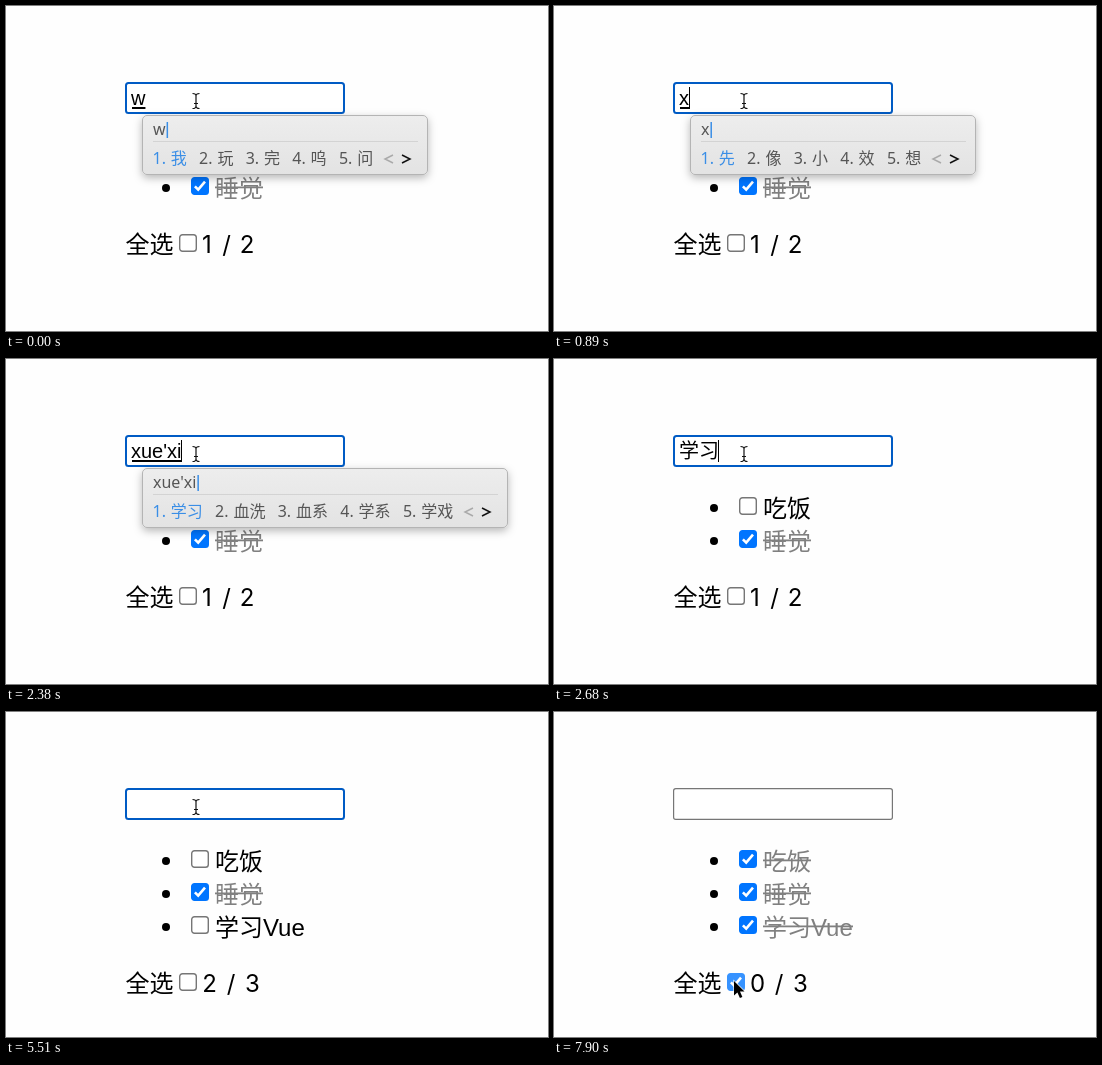
An HTML page that plays this animation: 542x325 px, repeating every 8 s.

```html
<!DOCTYPE html>
<html lang="zh-CN">
<head>
<meta charset="utf-8">
<title>Todo list</title>
<style>
  html, body { margin: 0; width: 100%; height: 100%; overflow: hidden; background: #fefefe; }
  svg { display: block; width: 100%; height: 100%; }
  text { white-space: pre; }
  .big { font: 24px "Liberation Sans", "Noto Sans CJK SC", "Noto Sans CJK", sans-serif; }
  .count { font: 24px Inter, "Noto Sans", sans-serif; text-anchor: middle; }
  .field { font: 20px "Liberation Sans", "Noto Sans CJK SC", "Noto Sans CJK", sans-serif; }
  .ime { font: 16px "Noto Sans", "Noto Sans CJK SC", "Noto Sans CJK", sans-serif; fill: #555; }
  .badge { font: 12px "Noto Sans", sans-serif; fill: #fff; text-anchor: middle; }
</style>
</head>
<body>
<svg id="stage" viewBox="0 0 542 325">
  <defs>
    <linearGradient id="panel" x1="0" y1="0" x2="0" y2="1">
      <stop offset="0" stop-color="#ededed"/>
      <stop offset="1" stop-color="#e3e3e3"/>
    </linearGradient>
    <filter id="soft" x="-20%" y="-40%" width="140%" height="190%">
      <feDropShadow dx="0" dy="3" stdDeviation="4" flood-color="#000" flood-opacity=".28"/>
    </filter>
  </defs>
</svg>
<script>
const LOOP = 8000;
const stage = document.getElementById('stage');
const pen = document.createElement('canvas').getContext('2d');
const FIELD_FONT = '20px "Liberation Sans", "Noto Sans CJK SC", "Noto Sans CJK", sans-serif';
const IME_FONT = '16px "Noto Sans", "Noto Sans CJK SC", "Noto Sans CJK", sans-serif';

function set(node, attrs) {
  for (const key in attrs) node.setAttribute(key, attrs[key]);
  return node;
}

function add(parent, tag, attrs = {}, text = '') {
  const node = document.createElementNS('http://www.w3.org/2000/svg', tag);
  if (text) node.textContent = text;
  return parent.appendChild(set(node, attrs));
}

const show = (node, on) => set(node, { visibility: on ? 'visible' : 'hidden' });

function measure(text, font) {
  pen.font = font;
  return pen.measureText(text).width;
}

function makeBox(parent, x, y) {
  const g = add(parent, 'g', { transform: `translate(${x} ${y})` });
  const frame = add(g, 'rect', { x: .7, y: .7, width: 16.6, height: 16.6, rx: 2.8, 'stroke-width': 1.4 });
  const tick = add(g, 'path', {
    d: 'M3.9 9.4 7.2 12.7 14 4.7', fill: 'none', stroke: '#fff', 'stroke-width': 2.6
  });
  return (on, mode = 'idle') => {
    const blue = { idle: '#0075ff', hover: '#005cc8', press: '#3793ff' }[mode];
    const gray = { idle: '#767676', hover: '#4f4f4f', press: '#8d8d8d' }[mode];
    set(frame, { fill: on ? blue : '#fff', stroke: on ? blue : gray });
    show(tick, on);
  };
}

// Input field
const frame = add(stage, 'rect', { fill: '#fff' });
const typed = add(stage, 'text', { class: 'field', x: 125, y: 99 });
const underline = add(stage, 'rect', { x: 126, y: 101, height: 2 });
const caret = add(stage, 'rect', { y: 81, width: 1, height: 22 });

// List
const rows = [['吃饭', 256], ['睡觉', 256], ['学习Vue', 298]].map(([label, end], i) => {
  const y = 148 + 33 * i;
  const g = add(stage, 'g');
  add(g, 'circle', { cx: 160, cy: y + 1, r: 4 });
  const box = makeBox(g, 185, y - 10);
  const text = add(g, 'text', { class: 'big', x: 209, y: y + 9.5 }, label);
  const strike = add(g, 'rect', { x: 209, y: y - .5, width: end - 208, height: 1.8, fill: '#808080' });
  return { g, box, text, strike };
});

// Footer
const footer = add(stage, 'g');
add(footer, 'text', { class: 'big', x: 119.5, y: 247 }, '全选');
const allBox = makeBox(footer, 173, 228);
const count = ['', '/', ''].map(s => add(footer, 'text', { class: 'count', y: 247 }, s));

// Candidate window
const ime = add(stage, 'g');
const panel = add(ime, 'rect', {
  x: 136.5, y: 109.5, height: 59, rx: 4.5, fill: 'url(#panel)', stroke: '#b4b4b4', filter: 'url(#soft)'
});
const spell = add(ime, 'text', { class: 'ime', x: 147, y: 129 });
const imeCaret = add(ime, 'rect', { y: 116, width: 1.5, height: 16, fill: '#3a8ee6' });
const rule = add(ime, 'rect', { x: 147, y: 135, height: 1, fill: '#d3d3d3' });
const choices = [0, 1, 2, 3, 4].map(i => {
  const style = i ? '' : 'fill:#3a8ee6';
  return [0, 1].map(() => add(ime, 'text', { class: 'ime', y: 158, style }));
});
const arrows = ['M9 -4 1 0 9 4', 'M1 -4 9 0 1 4'].map((d, i) =>
  add(ime, 'path', { d, fill: 'none', stroke: i ? '#111' : '#aaa', 'stroke-width': 1.5 }));

// Input source badge
const badge = add(stage, 'g');
add(badge, 'rect', { x: 167, y: 110, width: 20, height: 20, rx: 2, fill: '#999' });
add(badge, 'text', { class: 'badge', x: 177, y: 124.5 }, 'EN');

// Pointers
const beam = add(stage, 'g');
for (const [stroke, width] of [['#fff', 3], ['#111', 1.2]]) {
  add(beam, 'path', {
    d: 'M-3.5 -7.5Q0 -7.5 0 -5Q0 -7.5 3.5 -7.5M0 -5V5M-3.5 7.5Q0 7.5 0 5Q0 7.5 3.5 7.5M-2 2.5H2',
    fill: 'none', stroke, 'stroke-width': width
  });
}
const arrow = add(stage, 'path', {
  d: 'M0 0V14.5L3.4 11.4 5.9 17 8.4 15.9 6 10.5H10.5Z', stroke: '#fff', 'stroke-width': 1.2,
  'paint-order': 'stroke'
});

// Each step changes part of the state from its time on
const start = {
  text: 'w', words: '我 玩 完 呜 问', caret: false, badge: false, focus: true,
  items: 2, done: false, box: 'idle', pointer: 'beam', at: [190, 95]
};
const steps = [
  [440, { text: '', words: '', caret: true }],
  [890, { text: 'x', words: '先 像 小 效 想' }],
  [1040, { text: 'xu', words: '需 许 续 须 虚' }],
  [1640, { text: 'xue', words: '学 雪 血 穴 靴' }],
  [1780, { text: "xue'x", words: '学习 学校 学些 学 雪' }],
  [2080, { text: "xue'xi", words: '学习 血洗 血系 学系 学戏' }],
  [2680, { text: '学习', words: '' }],
  [3130, { caret: false, badge: true }],
  [3580, { text: '学习V', caret: true }],
  [3870, { text: '学习Vu' }],
  [4170, { text: '学习Vue' }],
  [4320, { badge: false }],
  [4620, { text: '', items: 3 }],
  [4760, { caret: false }],
  [5060, { caret: true }],
  [5510, { caret: false }],
  [5810, { pointer: 'arrow', at: [222, 180] }],
  [5960, { pointer: 'beam', at: [245, 274], caret: true }],
  [6110, { at: [212, 274] }],
  [6250, { at: [160, 274] }],
  [6400, { at: [127, 272], caret: false }],
  [6550, { at: [155, 270] }],
  [6700, { pointer: 'arrow', at: [183, 255] }],
  [6850, { at: [187, 249] }],
  [7000, { at: [180, 269], box: 'hover' }],
  [7150, { box: 'press', focus: false }],
  [7300, { box: 'hover', done: true }],
  [7900, { box: 'press' }]
];

function drawField(s) {
  const end = 125 + measure(s.text, FIELD_FONT);
  set(frame, s.focus
    ? { x: 120, y: 77, width: 218, height: 30, rx: 2.5, stroke: '#005bc4', 'stroke-width': 2 }
    : { x: 119.6, y: 76.6, width: 218.8, height: 30.8, rx: 2.2, stroke: '#767676', 'stroke-width': 1.2 });
  typed.textContent = s.text;
  set(underline, { width: Math.max(0, end - 126) });
  show(underline, s.words);
  set(caret, { x: Math.floor(end) });
  show(caret, s.caret && s.focus);
}

function drawIme(s) {
  show(ime, s.words);
  if (!s.words) return;
  const words = s.words.split(' ');
  const extra = 16 * (words.join('').length - 5);
  set(panel, { width: 285 + extra });
  set(rule, { width: 265 + extra });
  spell.textContent = s.text;
  set(imeCaret, { x: 148.5 + measure(s.text, IME_FONT) - .5 });
  let x = 146.5;
  choices.forEach(([number, word], i) => {
    number.textContent = `${i + 1}.`;
    word.textContent = words[i];
    set(number, { x });
    set(word, { x: x + 18.3 });
    x += 46.6 + 16 * (words[i].length - 1);
  });
  arrows.forEach((a, i) => set(a, { transform: `translate(${378 + 17 * i + extra} 153)` }));
}

function drawList(s) {
  rows.forEach((row, i) => {
    const done = s.done || i === 1;
    set(row.g, { display: i < s.items ? 'inline' : 'none' });
    row.box(done);
    set(row.text, { fill: done ? '#808080' : '#000' });
    show(row.strike, done);
  });
  set(footer, { transform: `translate(0 ${33 * (s.items - 2)})` });
  allBox(s.done, s.box);
  const places = s.items === 2 ? [201, 220.5, 241] : [203.5, 225, 246.5];
  count.forEach((node, i) => set(node, { x: places[i] }));
  count[0].textContent = s.done ? 0 : s.items - 1;
  count[2].textContent = s.items;
}

function render(t) {
  const s = Object.assign({}, start);
  for (const [time, change] of steps) if (t >= time) Object.assign(s, change);
  drawField(s);
  drawIme(s);
  drawList(s);
  show(badge, s.badge);
  for (const [node, name] of [[beam, 'beam'], [arrow, 'arrow']]) {
    show(node, s.pointer === name);
    set(node, { transform: `translate(${s.at})` });
  }
}

const origin = performance.now();
function tick() {
  render((performance.now() - origin) % LOOP);
  requestAnimationFrame(tick);
}
tick();
</script>
</body>
</html>
```
